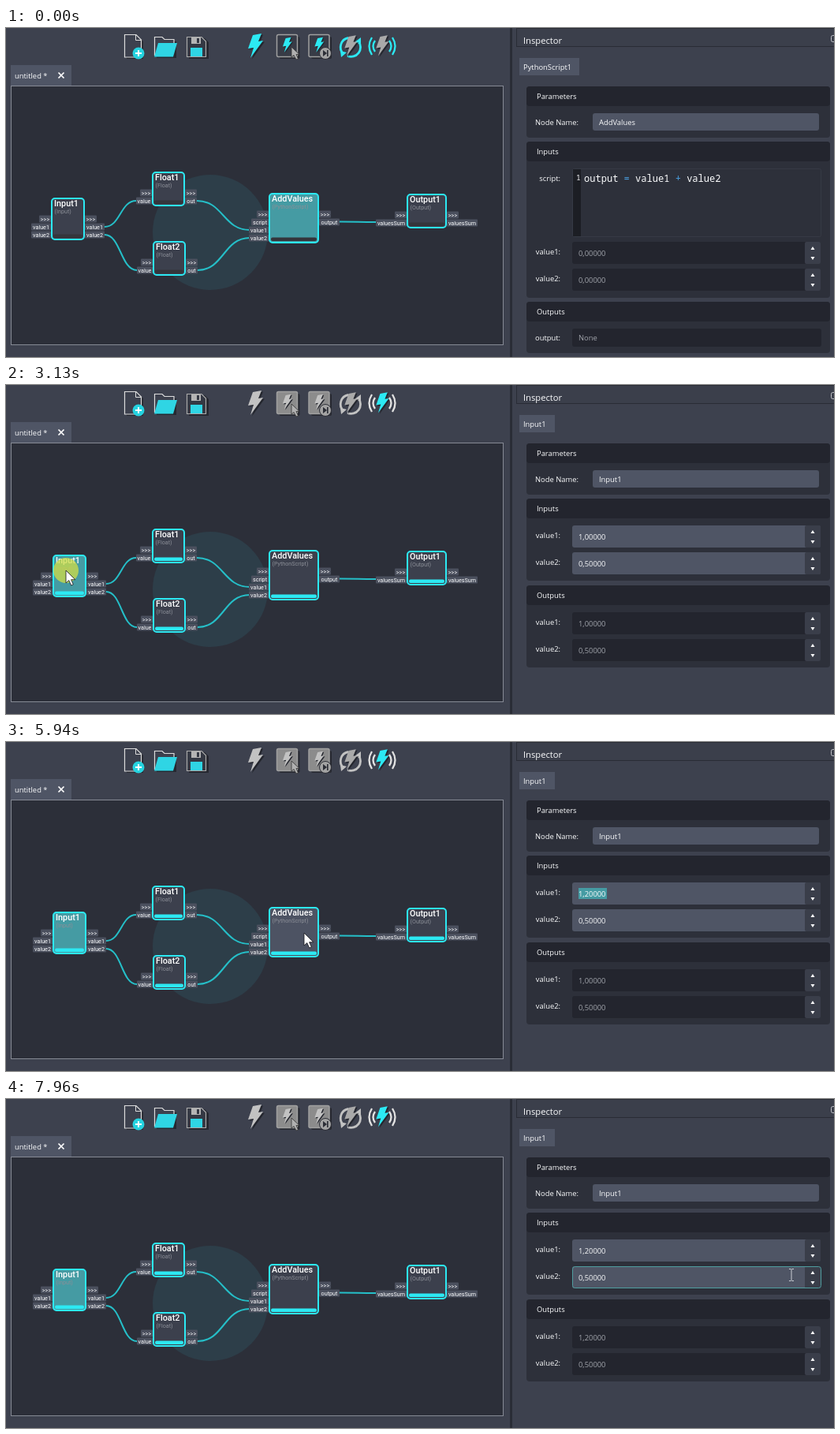
Write an HTML page that moves like this. It is 1050 px wide and 417 px high and loops after 8 s.

```html
<!DOCTYPE html>
<html lang="en">
<head>
<meta charset="utf-8">
<title>Node editor</title>
<style>
  html, body { margin: 0; width: 1050px; height: 417px; overflow: hidden; background: #3d414e; }
  svg { display: block; font: 500 9.4px "Open Sans", "Noto Sans", sans-serif; white-space: pre; }
  .title { font-size: 11.2px; }
  .name { font: 500 10.8px Roboto, sans-serif; }
  .type, .port { font: 7.2px Roboto, sans-serif; }
  .code { font: 12.05px "Noto Sans Mono", monospace; }
  .num { font: 9.5px "Noto Sans Mono", monospace; }
</style>
</head>
<body>
<svg id="stage" width="1050" height="417" viewBox="0 0 1050 417"></svg>
<script>
const LOOP = 8000;
const CYAN = '#2ce9f3', TEAL = '#459ba3', DARK = '#23252e', PANEL = '#2d303a',
      FIELD = '#4f5565', WHITE = '#fbfcfd', GREY = '#a2a5ac';

// Cursor stops: time, x, y
const STOPS = [
  [0, 935, 440], [260, 923, 414], [1060, 476, 32], [1650, 476, 32], [2050, 307, 150],
  [2450, 133, 234], [2580, 110, 235], [2720, 110, 235], [3000, 76, 235], [3200, 76, 235],
  [3470, 790, 226], [4140, 1026, 187], [4860, 1026, 187], [5120, 880, 285], [5380, 640, 280],
  [5860, 378, 242], [6280, 378, 242], [6490, 379, 244], [6690, 379, 244], [6900, 215, 283],
  [7100, 76, 241], [7480, 76, 241], [7960, 996, 223], [8000, 996, 223]
];
const CLICKS = [[1130, 1260], [3060, 3200], [4280, 4340], [4600, 4660], [6010, 6080], [7350, 7480]];

const within = (t, a, b) => t >= a && t < b;
const rect = (x, y, w, h, fill, r = 0, more = '') =>
  `<rect x="${x}" y="${y}" width="${w}" height="${h}" rx="${r}" fill="${fill}" ${more}/>`;
const text = (x, y, s, fill = WHITE, more = '') => `<text x="${x}" y="${y}" fill="${fill}" ${more}>${s}</text>`;
const path = (d, fill, more = '') => `<path d="${d}" fill="${fill}" ${more}/>`;
const line = (d, stroke, width = 1) => path(d, 'none', `stroke="${stroke}" stroke-width="${width}"`);
const at = (x, y, s, k = 1) => `<g transform="translate(${x} ${y}) scale(${k})">${s}</g>`;
const circle = (x, y, r, fill, more = '') => `<circle cx="${x}" cy="${y}" r="${r}" fill="${fill}" ${more}/>`;

function cursorAt(t) {
  const i = STOPS.findIndex(s => s[0] > t);
  const [t0, x0, y0] = STOPS[i - 1], [t1, x1, y1] = STOPS[i];
  const k = (t - t0) / (t1 - t0);
  return { x: x0 + (x1 - x0) * k, y: y0 + (y1 - y0) * k };
}

const over = (c, x, y, w, h) => within(c.x, x, x + w) && within(c.y, y, y + h);

function bolt(x, y, k, fill) {
  const d = 'M-3-13L8-15L4-5L10-6L-6 16L-2 3L-9 4Z';
  return at(x, y, at(2, 1.5, path(d, '#24262e')) + path(d, fill), k);
}

function toolbar(live) {
  const on = live ? '#c2c2c2' : CYAN, box = live ? '#8c8c8c' : '#373b46';
  const card = x => rect(x + 3, 11, 26, 28, '#262830', 2) +
    rect(x, 8.5, 26, 28, box, 2, 'stroke="#a0a0a0" stroke-width="1.5"') + bolt(x + 13, 21, .62, on);
  const wave = live ? '#e2e2e2' : CYAN;
  return path('M153 11H168L174 17V39H153Z', '#262830') +
    path('M150.5 8.5H165L171.5 15V37H150.5Z', '#3d414e', 'stroke="#dcdcdc" stroke-width="1.2"') +
    line('M164.5 9V15.5H171', '#dcdcdc') +
    circle(168, 32, 7.5, '#25d3e0') + line('M164 32H172M168 28V36', '#fff', 2) +
    // folder
    path('M191 14H200L203 17H216V38H191Z', '#262830') +
    path('M188.5 35V11.5H198L201 14.5H213V19', '#3d414e', 'stroke="#dcdcdc" stroke-width="1.2"') +
    path('M193 19H217L212 36.5H188Z', '#2fd5e4') +
    // floppy disk
    path('M232 13H252L257 18V39H232Z', '#262830') +
    path('M229.5 11.5H248L253.5 17V36.5H229.5Z', '#343843', 'stroke="#aaa" stroke-width="1.2"') +
    rect(235, 12, 12, 8, '#b4b4b4') + rect(242, 13, 3, 6, '#343843') + rect(234, 25, 15, 11, '#2fd5e4') +
    bolt(316, 22, 1, on) +
    card(343.5) + path('M362 24V37L365 34.5L368 40L370.5 39L368 33.5H372Z', '#b0b0b0', 'stroke="#333" stroke-width=".8"') +
    card(384) + circle(405, 32, 7.5, '#a3a3a3', 'stroke="#2b2d35"') +
    path('M402 28L407 32L402 36Z', '#2b2d35') + rect(407, 28, 1.6, 8, '#2b2d35') +
    // bolt inside turning arrows
    line('M428 33A12 12 0 0 1 434 12.500M447 17A12 12 0 0 1 433 35.500', on, 2.8) +
    path('M442 18L450 12L450 21ZM424 29L432 31L425 37Z', on) + bolt(437, 22, .85, '#a9a9a9') +
    // bolt with radio waves
    bolt(477, 22, .85, live ? CYAN : '#a9a9a9') +
    line('M468 16Q463 23 468 30M464 12Q457 23 464 34M486 16Q491 23 486 30M490 12Q497 23 490 34', wave, 2.3);
}

const wire = (x0, y0, x1, y1) => {
  const m = (x0 + x1) / 2;
  return line(`M${x0} ${y0}C${m} ${y0} ${m} ${y1} ${x1} ${y1}`, '#25bfc8', 2);
};

// Port widths follow their labels
const PORT_WIDTH = { '>>>': 15, value: 20, out: 15, script: 22, output: 26, valuesSum: 39 };

function node({ x, y, w, name, type, ins, outs, done, selected }, c) {
  const h = 34 + 10 * Math.max(ins.length, outs.length);
  const ports = (list, right) => ['>>>', ...list].map((s, i) => {
    const pw = PORT_WIDTH[s] || 25, px = right ? x + w : x - pw, py = y + 22.5 + i * 10;
    return rect(px, py, pw, 9, '#4b505e', 1) +
      text(px + pw / 2, py + 7, s.replaceAll('>', '&gt;'), WHITE, 'class="port" text-anchor="middle"');
  }).join('');
  const fill = selected ? TEAL : over(c, x, y, w, h) ? '#4d5363' : '#3c404d';
  return ports(ins, false) + ports(outs, true) +
    rect(x + 1, y + 1, w - 2, h - 2, fill, 4, `stroke="${CYAN}" stroke-width="2"`) +
    rect(x + 3, y + h - 7.5, w - 6, 4.5, done ? CYAN : '#34353b', 2) +
    text(x + 4, y + 11, name, '#fff', 'class="name"') +
    text(x + 4.5, y + 20, `(${type})`, '#8b8e97', 'class="type"');
}

function graph(s, c) {
  const ix = s.moved ? 59 : 57, done = s.live;
  const nodes = [
    { x: ix, y: 215, w: 43, name: 'Input1', type: 'Input', ins: ['value1', 'value2'], outs: ['value1', 'value2'],
      done: done && !s.stale, selected: s.input },
    { x: 185, y: 182, w: 42, name: 'Float1', type: 'Float', ins: ['value'], outs: ['out'], done },
    { x: 186, y: 270, w: 42, name: 'Float2', type: 'Float', ins: ['value'], outs: ['out'], done },
    { x: 333, y: 209, w: 64, name: 'AddValues', type: 'PythonScript', ins: ['script', 'value1', 'value2'],
      outs: ['output'], done, selected: !s.input },
    { x: 508, y: 210, w: 51, name: 'Output1', type: 'Output', ins: ['valuesSum'], outs: ['valuesSum'], done }
  ];
  return rect(6, 47, 77, 26, FIELD) + text(11, 64, 'untitled *') +
    line('M66.5 56.5L73.5 63.5M73.5 56.5L66.5 63.5', '#fff', 1.7) +
    rect(6.5, 73.5, 624, 328, '#2c2f39', 0, 'stroke="#868a95"') +
    circle(259, 259, 73, '#2d3e49') +
    wire(ix + 68, 252, 165, 219) + wire(ix + 68, 262, 166, 307) +
    wire(242, 219, 309, 256) + wire(243, 307, 309, 266) + wire(423, 245.5, 469, 246) +
    nodes.map(n => node(n, c)).join('');
}

function panel(y, bottom, title) {
  return rect(660, y, 385, bottom - y, PANEL, 4) + rect(660, y, 385, 25, DARK, 4) + text(673, y + 16, title);
}

const label = (y, s) => text(703, y, s, WHITE, 'text-anchor="end"');

function spinBox(y, name, value, enabled, c, { caret, marked, focus } = {}) {
  const hover = enabled && over(c, 718, y, 316, 28);
  const upHover = hover && over(c, 1013, y, 20, 14);
  return label(y + 16, name + ':') + rect(718, y, 315, 28, enabled ? FIELD : DARK, 3) +
    rect(1013, y, 20, 28, '#3a3e4a', 2) + (upHover ? rect(1013, y + 1, 20, 13, TEAL) : '') +
    path(`M1020.5 ${y + 10}h5l-2.5-4ZM1020.5 ${y + 19}h5l-2.5 4Z`, '#fff') +
    (marked ? rect(726, y + 7, 36, 14, TEAL) : '') +
    text(726, y + 18, value.toFixed(5).replace('.', ','), enabled ? WHITE : GREY) +
    (caret ? line(`M726.5 ${y + 8}V${y + 20}`, '#fff') : '') +
    (hover ? rect(718.5, y + .5, 315, 27, 'none', 3, `stroke="${focus ? '#38bdc5' : '#4f9ea0'}"`) : '');
}

function inspector(s, c) {
  const frame = rect(639, 0, 3, 417, '#2a2d36') +
    rect(647.5, .5, 410, 23, '#3b3f4b', 0, 'stroke="#292c35"') +
    text(656, 20, 'Inspector', WHITE, 'class="title"') +
    rect(1046.5, 9.5, 9, 8, 'none', 2, 'stroke="#c4c6cc"') +
    rect(651, 38, s.input ? 45 : 76, 22, FIELD) + text(656, 53, s.input ? 'Input1' : 'PythonScript1') +
    panel(74, 139, 'Parameters') + text(671, 123, 'Node Name:') +
    rect(744, 108, 287, 22, FIELD, 3) + text(752, 123, s.input ? 'Input1' : 'AddValues');
  if (s.input) {
    return frame + panel(144, 248, 'Inputs') +
      spinBox(178, 'value1', s.value1, true, c, s) + spinBox(212, 'value2', .5, true, c) +
      panel(254, 358, 'Outputs') +
      spinBox(288, 'value1', s.sent, false, c) + spinBox(322, 'value2', .5, false, c);
  }
  const blue = v => `<tspan fill="#4a9fe0">${v}</tspan>`;
  return frame + panel(144, 342, 'Inputs') + label(194, 'script:') +
    rect(718.5, 178.5, 315, 86, PANEL, 2, 'stroke="#363a45"') + rect(719, 179, 10, 85, '#1c1e24') +
    text(723, 193, '1', WHITE, 'class="num"') +
    text(733, 195, `output ${blue('=')} value1 ${blue('+')} value2`, WHITE, 'class="code"') +
    spinBox(271, 'value1', s.live ? s.value1 : 0, false, c) + spinBox(305, 'value2', s.live ? .5 : 0, false, c) +
    panel(347, 412, 'Outputs') + label(396, 'output:') + rect(718, 381, 316, 23, DARK, 3) +
    text(726, 396, !s.live ? 'None' : s.value1 === 1 ? '1.5' : '1.7000000000000002', GREY);
}

function pointer(t, s, c) {
  const ring = CLICKS.some(([a, b]) => within(t, a, b)) ? circle(0, 0, 16, '#d2dd45', 'opacity=".75"') : '';
  const beam = s.input && over(c, 718, 178, 295, 62);
  const shape = beam
    ? line('M-3-7.5H-.5M.5-7.5H3M0-7V7M-3 7.5H-.5M.5 7.5H3', '#c9ccd3')
    : path('M0 0V16L3.8 12.6L6.6 19L9.3 17.8L6.6 11.7H11.8Z', '#fff', 'stroke="#15161a" stroke-width=".8"');
  return at(c.x.toFixed(1), c.y.toFixed(1), ring + shape);
}

function stateAt(t) {
  return {
    live: t >= 1650,
    moved: t >= 3060,
    input: within(t, 3060, 6010) || t >= 7350,
    stale: within(t, 4280, 4660),
    caret: within(t, 4280, 4600),
    marked: within(t, 4660, 6010),
    focus: within(t, 4280, 6010),
    value1: t < 4280 ? 1 : t < 4600 ? 1.1 : 1.2,
    sent: t < 6010 ? 1 : 1.2
  };
}

const stage = document.getElementById('stage');
let shown = '';
function render(now) {
  const t = now % LOOP, s = stateAt(t), c = cursorAt(t);
  const scene = toolbar(s.live) + graph(s, c) + inspector(s, c) + pointer(t, s, c);
  if (scene !== shown) stage.innerHTML = shown = scene;
  requestAnimationFrame(() => render(performance.now() - start));
}
const start = performance.now();
render(0);
</script>
</body>
</html>
```
